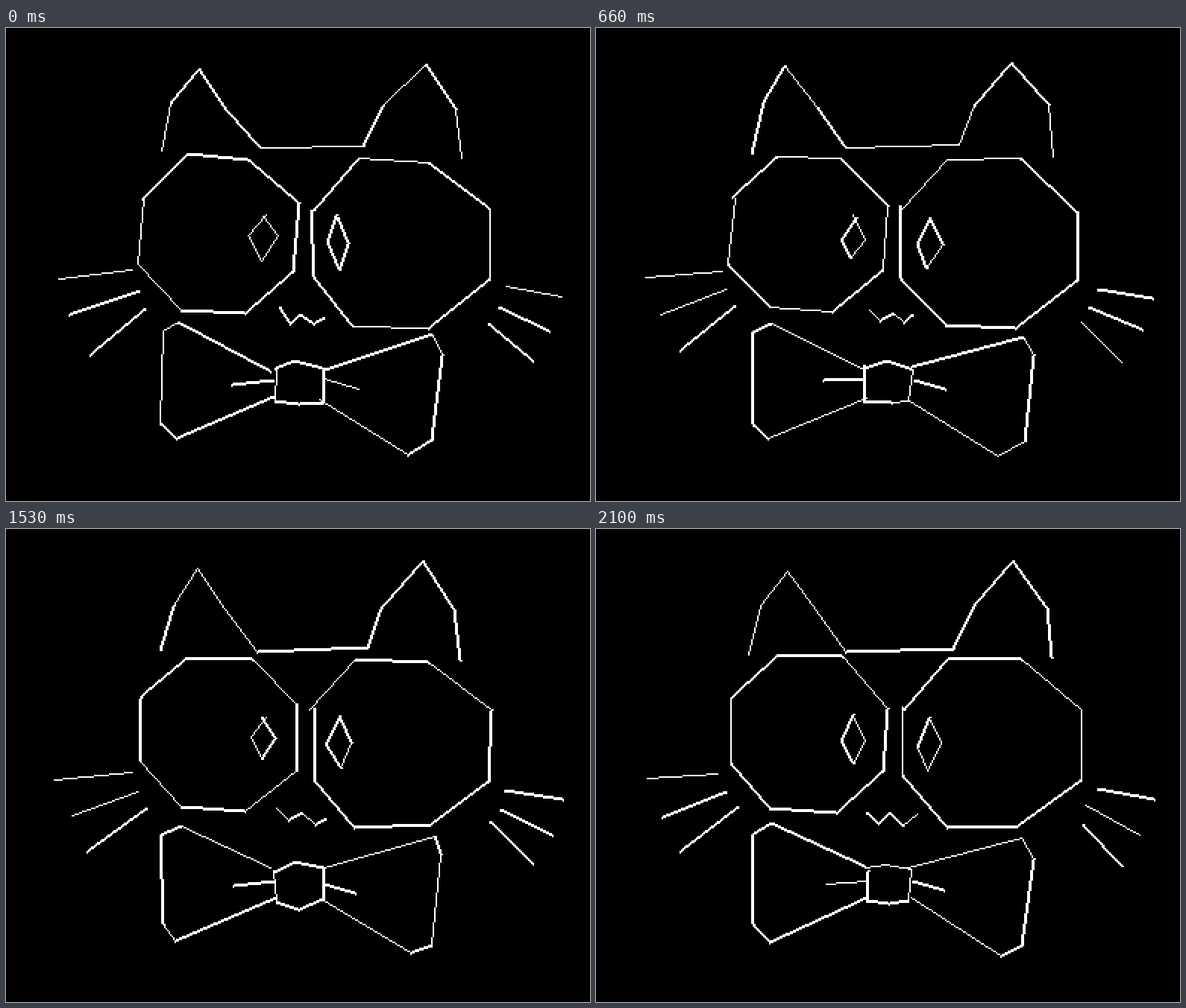
Animation of 783x635 px, one loop 2130 ms. Source, as an HTML page with a canvas:

```html
<!DOCTYPE html>
<html lang="en">
<head>
<meta charset="utf-8">
<title>Wobbly cat</title>
<style>
  html, body { margin: 0; width: 100%; height: 100%; overflow: hidden; background: #000; }
  canvas { display: block; width: 784px; height: 636px; image-rendering: pixelated; }
</style>
</head>
<body>
<canvas width="392" height="318"></canvas>
<script>
const ctx = document.querySelector('canvas').getContext('2d');
const LOOP = 2130, STEP = 30, WOBBLE = 3.7, THICK_SHARE = 0.65, PIXEL = 2;
const RAD = Math.PI / 180;

const path = text => text.split(' ').map(p => p.split(',').map(Number));
const list = (n, make) => Array.from({ length: n }, (_, i) => make(i));
// The first point is repeated so that both ends wobble on their own.
const closed = points => [...points, points[0]];

// Polygon on an ellipse; lean shifts its top and bottom sideways.
const ring = (n, cx, cy, rx, ry, from, lean = 0) => closed(list(n, i => {
  const a = (from + 360 / n * i) * RAD;
  return [cx + rx * Math.cos(a) + lean * Math.sin(a) ** 2, cy + ry * Math.sin(a)];
}));

// Three whiskers fanning out to one side (-1 left, 1 right).
const whiskers = (side, x, y, length, tilt) => list(3, i => {
  const a = (tilt + 17 * i) * RAD;
  const x0 = x - side * 10.5 * i, y0 = y + 23.5 * i;
  return [[x0, y0], [x0 + side * length * Math.cos(a), y0 + length * Math.sin(a)]];
});

const knotHalf = [[-30, -21], [-2, -29], [31, -22]];
const knot = closed([1, -1].flatMap(s =>
  knotHalf.map(([x, y]) => [392 + x * (s > 0 ? 1 : -1), 478 + y * s])));

const ears = path('208,166 223,101 256,53 294,107 339,161 483,159 506,104 560,46 603,106 611,174');
const mouth = list(5, i => [364 + 16 * i, 377 + 2 * i + 15 * (i % 2)]);
const bow = [
  '359,457 233,397 208,409 208,531 230,552 362,494',
  '423,457 573,414 585,440 572,556 542,572 424,498',
  '306,477 360,471',
  '425,475 470,487',
].map(path);

const shapes = [
  ears,
  ring(8, 286, 276, 112, 111, 205, -6),
  ring(8, 531, 289, 128, 121, 203, -15),
  ring(4, 345, 282, 17, 29, -90),
  ring(4, 446, 289, 15, 34, -90),
  mouth,
  ...whiskers(-1, 166, 329, 97, 4),
  ...whiskers(1, 671, 350, 79, 9),
  ...bow,
  knot,
];

function seeded(seed) {
  let s = Math.imul(seed + 1, 0x9E3779B1);
  return () => {
    s = s + 0x6D2B79F5 | 0;
    let h = Math.imul(s ^ s >>> 15, s | 1);
    h ^= h + Math.imul(h ^ h >>> 7, h | 61);
    return ((h ^ h >>> 14) >>> 0) / 2 ** 32;
  };
}

// Hard-edged line between whole pixels, w pixels across its shorter axis.
function line([x0, y0], [x1, y1], w) {
  const dx = x1 - x0, dy = y1 - y0;
  const flat = Math.abs(dx) > Math.abs(dy);
  const n = Math.max(1, Math.abs(dx), Math.abs(dy));
  const edge = v => Math.round(v - (w - 1) / 2);
  for (let i = 0; i <= n; i++) {
    const x = x0 + dx * i / n, y = y0 + dy * i / n;
    if (flat) ctx.fillRect(Math.round(x), edge(y), 1, w);
    else ctx.fillRect(edge(x), Math.round(y), w, 1);
  }
}

function draw(step) {
  const rnd = seeded(step);
  const jitter = v => Math.floor((v + (rnd() * 2 - 1) * WOBBLE) / PIXEL);
  ctx.fillStyle = '#000';
  ctx.fillRect(0, 0, 392, 318);
  ctx.fillStyle = '#fff';
  for (const shape of shapes) {
    const points = shape.map(p => p.map(jitter));
    for (let i = 1; i < points.length; i++)
      line(points[i - 1], points[i], rnd() < THICK_SHARE ? 2 : 1);
  }
}

const start = performance.now();
let shown = -1;
function tick() {
  const t = (performance.now() - start) % LOOP;
  // The opening pose is held a little shorter than the rest.
  const step = t < 20 ? 0 : Math.max(1, Math.floor(t / STEP));
  if (step !== shown) draw(shown = step);
  requestAnimationFrame(tick);
}
tick();
</script>
</body>
</html>
```
